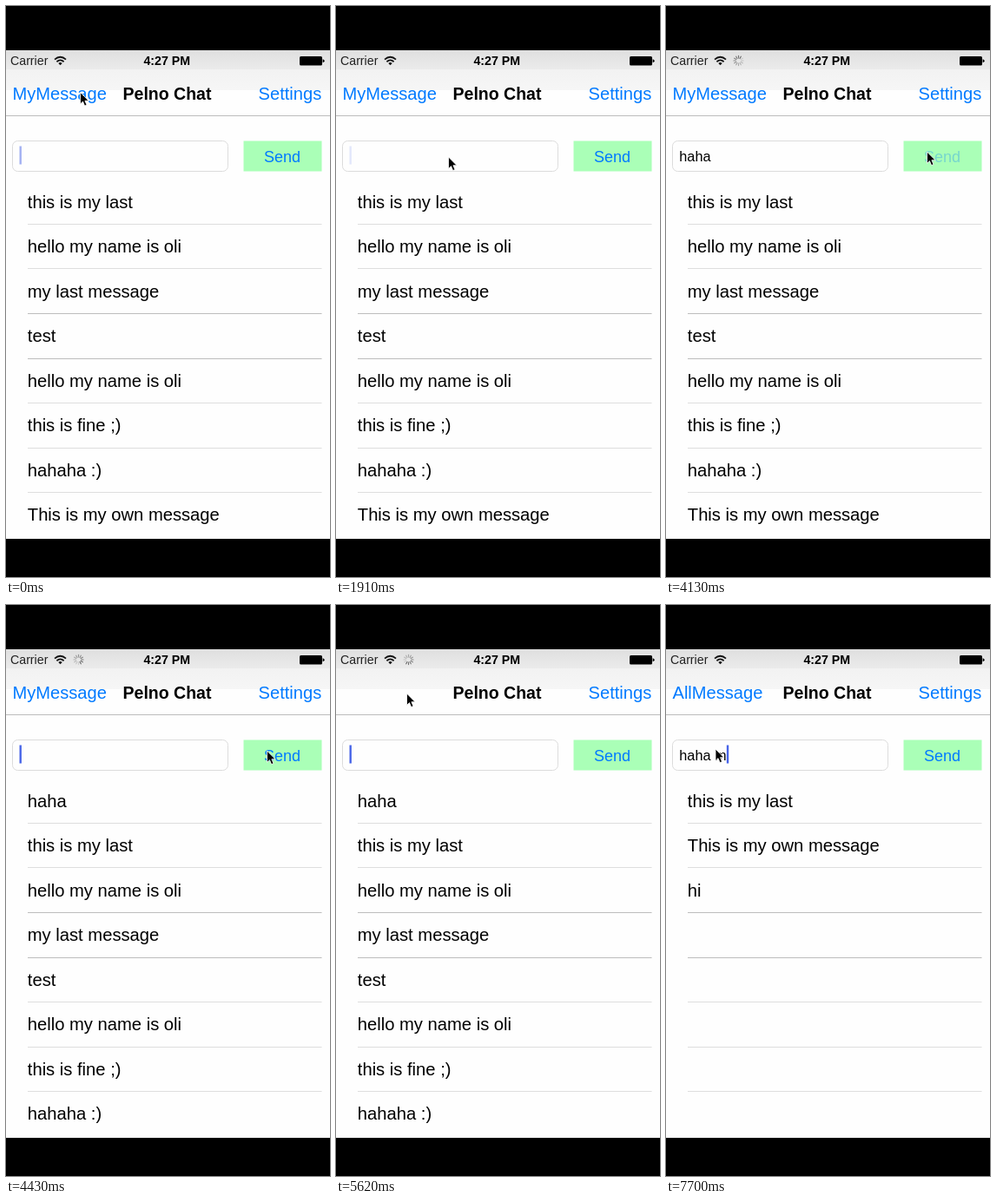
Write an HTML page that moves like this. It is 373x658 px and loops after 8000 ms.

```html
<!DOCTYPE html>
<html lang="en">
<head>
<meta charset="utf-8">
<title>Chat</title>
<style>
  html, body { margin: 0; width: 100%; height: 100%; overflow: hidden; background: #000; }
  svg { display: block; width: 373px; height: 658px; }
  text { font-family: "Liberation Sans", Arial, sans-serif; white-space: pre; }
  .status { font-size: 14.2px; fill: #222; }
  .bold { font-weight: bold; fill: #000; }
  .nav { font-size: 20.1px; }
  .link { fill: #007aff; }
  .row { font-size: 20.2px; }
</style>
</head>
<body>
<svg viewBox="0 0 373 658">
  <defs>
    <linearGradient id="bar" x2="0" y2="1">
      <stop offset="0" stop-color="#dfdfdf"/>
      <stop offset=".48" stop-color="#ebebeb"/>
      <stop offset=".48" stop-color="#f2f2f2"/>
      <stop offset="1" stop-color="#f6f6f6"/>
    </linearGradient>
  </defs>
  <rect y="51" width="373" height="563" fill="#fefefe"/>
  <rect y="51" width="373" height="46" fill="url(#bar)"/>
  <rect y="126" width="373" height="1" fill="#bcbcbc"/>

  <text class="status" x="5" y="68">Carrier</text>
  <g fill="none" stroke="#111" stroke-width="1.8">
    <path d="M56 61.6Q62.5 55.9 69 61.6M58.4 64.2Q62.5 60.6 66.6 64.2"/>
    <path d="M60.3 65.9Q62.5 64 64.7 65.9L62.5 68.2Z" fill="#111" stroke="none"/>
  </g>
  <g id="spinner" stroke="#666" stroke-width="1.1" stroke-linecap="round"></g>
  <text class="status bold" x="185.3" y="68" text-anchor="middle">4:27 PM</text>
  <rect x="338" y="58" width="26" height="10.4" rx="1.5"/>
  <path d="M364.6 61.2q2 .4 2 2t-2 2z"/>

  <text class="nav link" id="filter" x="7.5" y="108"></text>
  <text class="bold" x="185.5" y="108" font-size="19.5" text-anchor="middle">Pelno Chat</text>
  <text class="nav link" x="363.2" y="108" text-anchor="end">Settings</text>

  <rect x="7.5" y="155.5" width="248" height="35" rx="6" fill="#fefefe" stroke="#dcdcdc"/>
  <text id="input" x="15.3" y="179" font-size="16.3"></text>
  <rect id="caret" y="161.5" width="2.4" height="21" fill="#4865e8"/>
  <rect x="273.5" y="155.5" width="90" height="35" fill="#aaffb7"/>
  <text class="link" id="send" x="318" y="180" font-size="18" text-anchor="middle">Send</text>

  <g id="lines"></g>
  <g id="list"></g>
  <path id="pointer" d="M0 0V13.4L3 10.6L5.1 15.6L7.5 14.6L5.4 9.7H9.6Z" stroke="#fff" stroke-width=".8"/>
</svg>
<script>
// Screen updates per loop; all moments below count these ticks.
const LOOP = 8000, TICKS = 54, ROW = 51.55;
const PRESS = 28, SENT = 29, TAP = 38, SWITCH = 39, LOADED = 40, FOCUS = 44;
const $ = id => document.getElementById(id);

function add(parent, tag, attrs) {
  const el = document.createElementNS('http://www.w3.org/2000/svg', tag);
  for (const k in attrs) el.setAttribute(k, attrs[k]);
  return parent.appendChild(el);
}

const own = 'This is my own message';
const everyone = ['this is my last', 'hello my name is oli', 'my last message', 'test',
  'hello my name is oli', 'this is fine ;)', 'hahaha :)', own];
const sent = ['haha', ...everyone.slice(0, 7)];
const mine = ['this is my last', own, 'hi'];

// One letter per tick; an empty text is a fresh focus.
const entries = [
  { from: -4, text: '' }, { from: 14, text: 'haha' }, { from: SENT, text: '' },
  { from: FOCUS, text: '' }, { from: 47, text: 'haha m' }
];

const moves = [
  { from: 0, to: 4, x: 148, y: 212 },
  { from: 4, to: 7, x: 129.5, y: 174 },
  { from: 21, to: 23, x: 188.5, y: 174 },
  { from: 23, to: 27, x: 300.5, y: 168 },
  { from: 35, to: TAP, x: 81.5, y: 102 },
  { from: SWITCH, to: 42, x: 69, y: 148 },
  { from: 42, to: FOCUS, x: 57, y: 166 }
];

function pointerAt(n) {
  let x = 85.5, y = 99.5;
  for (const m of moves) {
    const u = Math.min(1, Math.max(0, (n - m.from) / (m.to - m.from)));
    const ease = u * u * (3 - 2 * u);
    x += (m.x - x) * ease;
    y += (m.y - y) * ease;
  }
  return [x, y];
}

// Solid just after a key, then a soft blink.
function caretOpacity(age) {
  if (age < 3) return 1;
  const wave = .5 - .9 * Math.sin((age - 4) / 6.3 * 2 * Math.PI);
  return Math.min(1, Math.max(0, wave));
}

const rows = everyone.map((_, i) =>
  add($('list'), 'text', { class: 'row', x: 24.8, y: 232.6 + i * ROW }));
for (let i = 0; i < 7; i++)
  add($('lines'), 'rect', { x: 25, y: Math.round(250.9 + i * ROW), width: 338.5, height: 1,
    fill: i === 2 || i === 3 ? '#bdbdbd' : '#dedede' });
const spokes = Array.from({ length: 12 }, (_, i) =>
  add($('spinner'), 'path', { d: 'M0-3V-5.6', transform: `translate(83.5 63) rotate(${i * 30})` }));

function setText(el, s) {
  if (el.textContent !== s) el.textContent = s;
}

function draw(n) {
  const { from, text } = entries.findLast(e => e.from <= n);
  const typed = text.slice(0, n - from + 1);
  const age = n - from - Math.max(0, text.length - 1);
  const blurred = n >= SWITCH && n < FOCUS;
  setText($('input'), typed);
  $('caret').setAttribute('x', 15.5 + (typed ? $('input').getComputedTextLength() : 0));
  $('caret').style.opacity = blurred ? 0 : caretOpacity(age);

  const shown = n < SENT ? everyone : n < LOADED ? sent : mine;
  rows.forEach((row, i) => setText(row, shown[i] || ''));
  setText($('filter'), n < TAP ? 'MyMessage' : n < SWITCH ? '' : 'AllMessage');
  $('send').style.opacity = n === PRESS ? .3 : 1;
  $('pointer').setAttribute('transform', `translate(${pointerAt(n)})`);

  $('spinner').style.opacity = n >= PRESS && n < LOADED ? 1 : 0;
  const head = Math.floor(n * LOOP / TICKS * 12 / 1000);
  spokes.forEach((spoke, i) => spoke.style.opacity = 1 - .8 * ((head - i + 12) % 12) / 11);
}

const start = performance.now();
function frame() {
  // The small lead keeps ticks ahead of rounded frame times.
  const t = (performance.now() - start + 25) % LOOP;
  draw(Math.floor(t / LOOP * TICKS));
  requestAnimationFrame(frame);
}
frame();
</script>
</body>
</html>
```
